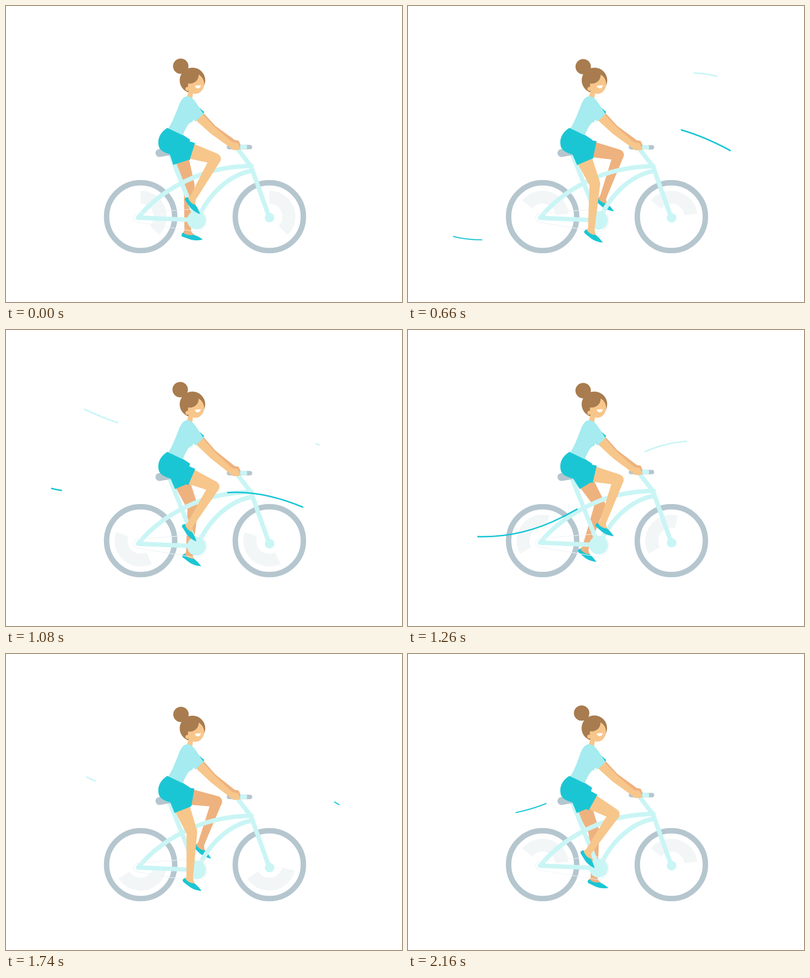
Animation, 800 px wide and 600 px high, one loop 2.22 s. Source, as an HTML page with a canvas:

```html
<!DOCTYPE html>
<html>
<head>
<meta charset="utf-8">
<title>Cyclist</title>
<style>
html, body { margin: 0; width: 100%; height: 100%; overflow: hidden; background: #fff }
canvas { display: block }
</style>
</head>
<body>
<canvas id="stage" width="800" height="600"></canvas>
<script>
const ctx = document.getElementById('stage').getContext('2d');
const TAU = 2 * Math.PI;
const TEAL = '#1bc6d4', PALE = '#caf5f5', GREY = '#b5c6cf', SKIN = '#f7c68b',
  SHADE = '#eeb27f', HAIR = '#a87c4f', SHIRT = '#a5ebef';
const PEDAL_PERIOD = 31.5;
const HIP = [345, 285], THIGH = 82, SHIN = 95;

// [phase, ankle x, ankle y, foot angle]
const NEAR = [[0, 376, 392, 46], [4, 395, 393, 30], [7, 406, 413, 12], [9.5, 406, 430, 0],
  [11, 406, 431, 0], [14, 392, 448, 12], [16.5, 371, 456, 30], [18, 370, 455, 31],
  [22, 354, 437, 48], [25.5, 354, 412, 52], [28.5, 363, 403, 50], [30, 370, 398, 49]];
const FAR = [[0, 367, 458, 11], [4, 356, 443, 35], [9.5, 356, 411, 50], [11, 361, 404, 54],
  [16.5, 393, 388, 36], [18, 393, 391, 32], [22, 405, 408, 18], [25, 400, 434, 4],
  [28.5, 376, 456, 17], [30, 370, 455, 29]];

const GUST = new Path2D('M674 452C600 408 530 384 465 384C390 384 345 418 310 435C265 458 210 474 150 474C130 474 110 472 91 467');
const BREEZE = new Path2D('M629 144C612 139 595 136 576 136C510 136 470 160 423 178C385 193 340 203 295 202C250 200 200 180 157 160');
// dx, dy, first frame, frames for the head, frames for the tail, width
const GUSTS = [[0, 0, 5.3, 9.5, 16, 2.2], [0, -146, 16, 9.5, 16, 3],
  [0, -55, 26.3, 9.5, 16, 3], [0, -146, 47.7, 15.7, 20, 2.2]];
const BREEZES = [[0, 0, 16.9, 10, 17.5, 3], [5, 89, 29.7, 16, 21, 3]];

const SHOE = new Path2D('M-9 3C-13 8-11 12-5 12L8 14C18 15 27 12 33 9C26 6 20 4 13 3C6 7-3 7-9 3Z');
const INSTEP = new Path2D('M-6.5-4L6.5-4C8 0 11 1 14 3C6 8-3 8-9 4Z');
const HIPS = new Path2D('M326 247C312 256 306 268 308 281C309 292 318 297 333 301L350 307L362 300L372 271L357 261Z');
const SADDLE = new Path2D('M309 290H340V301L311 306A8 8 0 0 1 309 290Z');
const TOP_TUBE = new Path2D('M267 429C300 388 340 364 380 347C415 332 455 325 496 324');
const LOWER_TUBE = new Path2D('M389 428C410 382 450 342 497 334');
const FORK = new Path2D('M469 291L495 325L532 429');
const STAYS = new Path2D('M331 298L385 434L267 429');
const CHAIN = new Path2D('M267 420L384 411A23 23 0 0 1 381 457L266 438A9 9 0 0 1 267 420Z');
const FACE = new Path2D('M389 139C397 143 401 152 400.500 160C398 172 391 178 383 178C381 178 379 178 378 177L376 188L365 186L369 172C368 168 367 162 368 157C380 159 390 150 389 139Z');
const SMILE = new Path2D('M381.500 161.500L393.500 160.500A6 6 0 0 1 381.500 161.500Z');

const clamp = v => Math.max(0, Math.min(1, v));
const swing = v => (1 - Math.cos(v)) / 2;

function fill(shape, color) {
  ctx.fillStyle = color;
  ctx.fill(shape);
}

function stroke(shape, color, width) {
  ctx.strokeStyle = color;
  ctx.lineWidth = width;
  ctx.stroke(shape);
}

function arc(x, y, r, from = 0, to = TAU) {
  const p = new Path2D();
  p.arc(x, y, r, from, to);
  return p;
}

const poly = points => new Path2D('M' + points.map(p => p.join(' ')).join('L') + 'Z');

function at(dx, dy, draw) {
  ctx.save();
  ctx.translate(dx, dy);
  draw();
  ctx.restore();
}

// A bar from a to b with its own half width at each end
function taper(a, b, wa, wb, color) {
  const angle = Math.atan2(b[1] - a[1], b[0] - a[0]);
  const nx = -Math.sin(angle), ny = Math.cos(angle);
  fill(poly([[a[0] + nx * wa, a[1] + ny * wa], [b[0] + nx * wb, b[1] + ny * wb],
    [b[0] - nx * wb, b[1] - ny * wb], [a[0] - nx * wa, a[1] - ny * wa]]), color);
}

function wind(path, color, right, left, runs, n) {
  for (const [dx, dy, start, head, tail, width] of runs) {
    const p = n - start;
    if (p <= 0 || p >= tail) continue;
    const from = right - (right - left) * clamp(p / head);
    const to = right - (right - left) * swing(Math.PI * p / tail);
    at(dx, dy, () => {
      ctx.beginPath();
      ctx.rect(from, 0, to - from, 600);
      ctx.clip();
      stroke(path, color, width);
    });
  }
}

function pose(keys, n) {
  const p = n % PEDAL_PERIOD;
  const i = keys.findLastIndex(k => k[0] <= p);
  const a = keys[i], b = keys[(i + 1) % keys.length];
  const span = (b[0] - a[0] + PEDAL_PERIOD) % PEDAL_PERIOD;
  const [x, y, turn] = a.slice(1).map((v, j) => v + (b[j + 1] - v) * (p - a[0]) / span);
  const dx = x - HIP[0], dy = y - HIP[1], d = Math.hypot(dx, dy);
  const bend = Math.acos(Math.min(1, (THIGH ** 2 + d * d - SHIN ** 2) / (2 * THIGH * d)));
  const angle = Math.atan2(dy, dx) - bend;
  const along = r => [HIP[0] + r * Math.cos(angle), HIP[1] + r * Math.sin(angle)];
  return { ankle: [x, y], turn: turn * Math.PI / 180, along };
}

function leg({ ankle, turn, along }, color) {
  const knee = along(THIGH);
  taper(along(28), knee, 16, 11, color);
  fill(arc(...knee, 10.8), color);
  taper(knee, ankle, 10.8, 6.5, color);
  at(...ankle, () => {
    ctx.rotate(turn);
    fill(INSTEP, color);
    fill(SHOE, TEAL);
  });
}

const shorts = ({ along }) => taper(HIP, along(33), 18, 18, TEAL);

function wheel(x, n) {
  const start = (n * 360 / 21 - 90) * Math.PI / 180;
  stroke(arc(x, 427, 39.5, start, start + TAU * 0.375), '#f2f6f7', 26);
  stroke(arc(x, 427, 68.8), GREY, 11);
}

function bikeFrame() {
  ctx.lineJoin = ctx.lineCap = 'round';
  for (const tube of [TOP_TUBE, LOWER_TUBE, FORK, STAYS]) stroke(tube, PALE, 9);
  ctx.lineCap = 'butt';
  fill(arc(385, 434, 19), PALE);
  fill(arc(532.5, 429, 9.7), PALE);
  stroke(CHAIN, '#edf3f6', 1.2);
}

function handlebar() {
  const bar = new Path2D();
  bar.roundRect(446, 281.5, 51.5, 9, 4.5);
  fill(bar, GREY);
  const clampRing = new Path2D();
  clampRing.roundRect(473, 281.5, 14, 9, 3);
  fill(clampRing, PALE);
}

function torso(b, h) {
  fill(poly([[392, 212], [400, 218], [423, 243 + b / 3], [462, 271.5 + b], [470, 273 + b],
    [475, 284 + b], [466, 284 + b], [457, 276 + b], [416, 250 + b / 3]]), SHADE);
  fill(poly([[388, 204], [400.5, 215], [394, 223]]), TEAL);
  at(0, b, handlebar);
  fill(poly([[397, 219], [422, 246 + b / 3], [457, 276 + b], [468, 278 + b], [474, 290 + b],
    [469, 292 + b], [459, 292 + b], [453, 287 + b], [414, 259 + b / 3], [383, 231]]), SKIN);
  const s = 4 * h;
  fill(new Path2D(`M328 248C336 236 342 220 ${349 - s} 202C${353 - s} 192 ${358 - s} 183 ${366 - s} 183
    C${374 - s / 2} 183 379 189 384 196L399 219L383 234L378 230Q378 235 373 236Q367 238 357 262Z`), SHIRT);
}

function head(h, n) {
  at(-1.4 * h, -2 * h, () => {
    fill(arc(376.7, 150.7, 25.8), HAIR);
    fill(FACE, SKIN);
    fill(arc(366.5, 168, 4), SKIN);
    fill(SMILE, '#fff');
  });
  const lift = 4 * swing(TAU * (n - 2.6) / 15.75);
  fill(arc(354 - lift, 123 - lift, 15.6), HAIR);
}

function draw(n) {
  ctx.fillStyle = '#fff';
  ctx.fillRect(0, 0, 800, 600);
  const bob = 4.2 * swing(TAU * n / 20);
  const h = swing(TAU * (n - 0.8) / 15.75) ** 2;
  const near = pose(NEAR, n), far = pose(FAR, n);

  wheel(272, n);
  wheel(532, n);
  wind(BREEZE, PALE, 629, 157, BREEZES, n);
  leg(far, SHADE);
  at(0, bob, bikeFrame);
  fill(SADDLE, GREY);
  shorts(far);
  leg(near, SKIN);
  shorts(near);
  fill(HIPS, TEAL);
  head(h, n);
  torso(bob, h);
  wind(GUST, TEAL, 674, 91, GUSTS, n);
}

// Every fifth pose is held twice as long
function poseIndex(ms) {
  const t = ms % 2220 - 60;
  return t < 0 ? 0 : 1 + 5 * Math.floor(t / 180) + Math.min(4, Math.floor(t % 180 / 30));
}

const begin = performance.now();
function tick() {
  draw(poseIndex(performance.now() - begin));
  requestAnimationFrame(tick);
}
tick();
</script>
</body>
</html>
```
